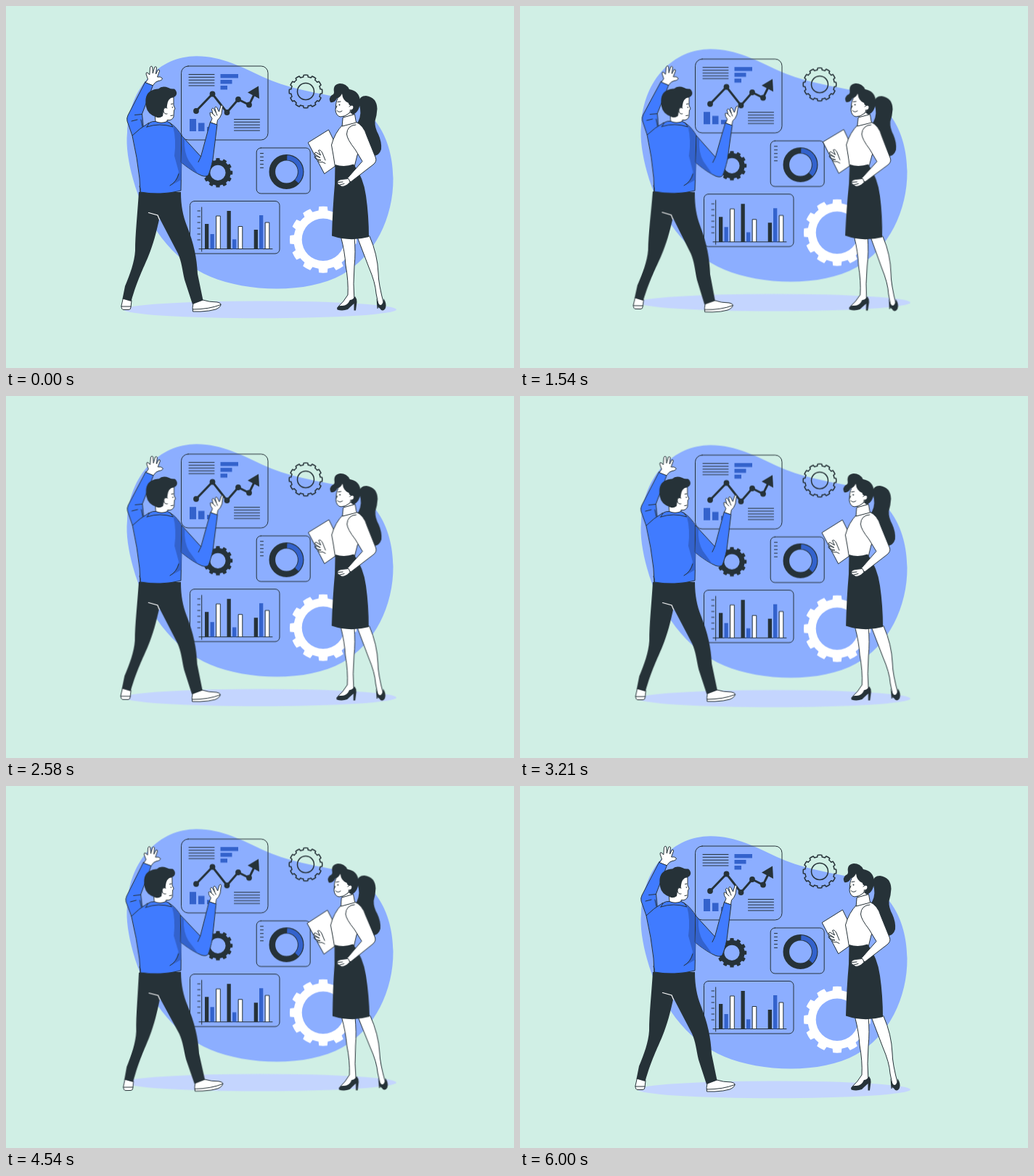
An HTML page that plays this animation: 700x500 px, repeating every 6.04 s.

```html
<!DOCTYPE html>
<html lang="en">
<head>
<meta charset="utf-8">
<title>Data presentation</title>
<style>
  html, body { margin: 0; width: 100%; height: 100%; overflow: hidden; background: #d0efe5; }
  svg { display: block; width: 100%; height: 100%; }
  .float { animation: float 6.04s linear infinite; }
  .sway { animation: sway 6.04s linear infinite; }
  #man { transform-origin: 228px 252px; }
  #woman { transform-origin: 471px 264px; }
  /* 6 s of motion, then a 40 ms rest before the loop restarts */
  @keyframes float {
    0%, 49.669%, 99.338%, 100% { transform: translateY(0); }
    24.834%, 74.503% { transform: translateY(-10px); }
  }
  @keyframes sway {
    0%, 99.338%, 100% { transform: rotate(0deg); }
    24.834% { transform: rotate(1deg); }
    74.503% { transform: rotate(-1deg); }
  }
  .dark { fill: #263238; }
  .deep { fill: #3362cc; }
  .blue { fill: #407bff; }
  .white { fill: #fff; }
  .line { fill: none; }
  .ink { stroke: #263238; stroke-width: 1; stroke-linejoin: round; stroke-linecap: round; }
</style>
</head>
<body>
<svg viewBox="0 0 700 500">
  <g class="float">
    <path fill="#8caeff" d="M262 69.3C297 69 326 85 354 98C387 113 420 118.500 452 125C507 135 533 183 533.5 238C534 292 508 346 463 371C415 398 332 395 282 374C229 352 191 298 175 239C169 217 165 194 167 175C170 111 212 69.500 262 69.3Z"/>
    <ellipse cx="350" cy="419.3" rx="188" ry="11.9" fill="#c4d5fe"/>

    <g id="trend">
      <rect class="line ink" x="241.5" y="83" width="119.5" height="102" rx="9.5"/>
      <path class="line ink" d="M252 94.5h35M252 98.4h35M252 102.3h35M252 106.2h35M252 110h35M314.500 156.500h35M314.500 160.300h35M314.500 164.200h35M314.500 168.100h35M314.500 172h35"/>
      <path class="deep" d="M295.500 94H320V99.600H295.500ZM295.500 102H311.500V107.600H295.500ZM295.500 110H305V115.600H295.500ZM253 156H262V173H253ZM265 161.500H273.500V173H265ZM277 167H285.500V173H277Z"/>
      <path class="line" stroke="#263238" stroke-width="2.9" d="M262 145L284.500 121.500L304.500 147L320 129L335 136.500L343.500 119"/>
      <path class="dark" d="M348 110.500L333 119.500L349 128Z"/>
      <g class="dark" id="dots"></g>
    </g>

    <g id="share">
      <rect class="line ink" x="345.2" y="196" width="74" height="63" rx="6"/>
      <path class="line ink" d="M350.500 203.500h4M350.500 208.500h4M350.500 213.500h4M350.500 218.500h4M350.500 223.500h4"/>
      <circle class="line" cx="386.5" cy="229" r="19.7" stroke="#263238" stroke-width="8.6"/>
      <path class="line" stroke="#3362cc" stroke-width="6.6" d="M387.300 209.500A19.500 19.500 0 0 1 400.700 242.400"/>
    </g>

    <g id="columns">
      <rect class="line ink" x="253.5" y="269.5" width="123.500" height="72.500" rx="6"/>
      <path class="line ink" d="M269.700 278V339M266 335.500H367M264 283h3.500M264 291h3.500M264 299h3.500M264 307h3.500M264 315h3.500M264 323h3.500"/>
    </g>
    <g id="gears"></g>
  </g>

  <g id="man" class="sway">
    <g class="white ink">
      <path d="M161.500 403L159 414Q159 419.500 162 419.500H169Q172 419.500 172 416L173 407Z"/>
      <path d="M258 410.500Q256.500 417 257.500 422H268Q281 421.500 289 419Q296 416 296 412Q296 410 291 409Q280 409 271 406Z"/>
      <path class="line" d="M159 415H172M257.300 419Q280 419 296 412.500"/>
    </g>
    <path class="dark" d="M183 257H241C241 276 244 290 249 303C259 328 263 348 264 370L271.500 406.500L257 412L246 378C243 365 242 353 237 342L211.500 293C207 313 203 329 196 346C189 363 181 378 172.500 408L160.500 404.500L164 387C171 370 177 354 178 338C178 315 181 290 183 257Z"/>
    <path class="line" stroke="#fff" stroke-linecap="round" stroke-width="1.2" d="M196.500 285.500L209 289L211.500 295"/>

    <path class="blue ink" d="M174 179L167 159Q166 155 168 151L192 104.500L202.500 109.500L187.500 149L190 174Z"/>
    <path class="line ink" d="M173 159L181 157M177.500 150.500L187.500 149.500M186 157L189 171"/>
    <path class="white ink" d="M192.500 105.500L195.500 101L193 94Q193 91 195 92L197.800 95L198.500 85Q200 81.500 201.700 84L202.300 93L204.700 84.500Q206.700 82.500 207.500 85L206.500 94L209.500 88Q211.500 87 211.500 90L208.500 98Q213 97 215.500 100Q215 103 210 103.500Q206 104 202.500 109.500Z"/>

    <path class="blue ink" d="M196 162Q184 169 174 179Q181 210 184 238L185 257Q213 262 241 255L242.500 180Q236 168 226 161.500Q211 157 196 162Z"/>
    <path class="deep" d="M230 166Q238 171 242.500 181L241.500 240L227 248Q235 242 238 229L232 207Q235 185 230 166Z"/>
    <path class="line ink" d="M238 232Q235 243 226 248M184 249Q186 253 185 257"/>
    <path class="blue ink" d="M242 179L268.500 208L281.500 160L291 163.500L285 212Q282 226 279 233Q277 236.500 270 234.500Q257 229 241.500 216Z"/>
    <path class="deep" d="M242.500 180L246 184Q245 202 252 214L265 232Q252 225 241.500 216Z"/>
    <path class="line ink" d="M268.500 208L265 215.500"/>
    <path class="white ink" d="M282 160.500L284 155.500Q280.500 151 281 147.500Q282.500 145.500 285 149L283.500 143Q284.500 139.500 286.500 142.500L289.500 147.500L287.700 141Q289 137.500 291 141L293.500 146L296 138Q298 135.500 298.500 138.500L297 149Q295 155 291.500 157.500L290.500 163.500Z"/>
    <path class="line ink" d="M285 149L288 152M289.500 147.500L291 151"/>

    <path class="white ink" d="M205 147L206 160Q214 164 222 160V157.500Q229 158.500 231 153L231.500 144L233 142L231 137V126H216Z"/>
    <path class="blue ink" d="M194 167L197.500 161.500Q201 159 206 159.500Q214 163 222 159.500L226 161.500L230 167Q212 161 194 167Z"/>
    <path class="dark" d="M193 139Q190 122 200 117Q205 114 210 114.500Q215 109.500 224 113Q227 115 232 114.500Q236 118 235 122Q233 126.500 229.500 126Q223 128 222 137L221.500 142Q218 141 217 145L216 152Q211 156 206 153Q195 149 193 139Z"/>
    <path class="white ink" d="M222 141Q217 139 217 145Q218 150 222 149"/>
    <path class="line ink" d="M227.500 135.500L230 135M229.300 139.500v1M227 151.500L230 151"/>
  </g>

  <g id="woman" class="sway">
    <path class="dark" d="M486 133Q487 124 496 124Q511 126 511.500 142Q511 151 508.500 159Q508 168 513 177Q518 188 517 198Q514 208 504 207L482 165Q490 154 488 142Z"/>
    <path class="white ink" d="M416.500 188.500L444.500 171L465 213L439 231.500Z"/>

    <g class="white ink">
      <path d="M461.500 319Q467 340 468 358Q472 380 471 399Q465 409 458 415L470 418L480 408Q478 384 480 359Q482 340 480 319Z"/>
      <path d="M484 319L500 361Q509 382 510 397L514 417L521 413Q513 383 513 369Q512 343 501 318Z"/>
    </g>
    <path class="dark" d="M456 417Q458 413.500 462 414Q470 415 474 406Q478 406 481 401Q484 405 483.500 409L482 420.500H479.500L479.500 411Q474 416 471 419Q464 421.500 456.500 419.500Z"/>
    <path class="dark" d="M510.500 404Q514 416 518 412Q521 408 520.500 404Q525 412 523 417Q521 421.500 517 420L513 415L512.500 418L511.500 418Z"/>

    <path class="white ink" d="M464 164Q453 175 448.500 192Q451 205 453.500 222H480L484 206L497 180Q493 166 482 160Z"/>
    <path class="dark" d="M453.500 219Q466 223 479 218.500Q493 238 496 262Q500 290 500 319Q474 326 449 317.500Q450 280 453 246Z"/>
    <path class="white ink" d="M482 160Q493 165 497 179L509.500 210Q511 215 506 219L475 243L469.500 239L491 214.500L481 198Q470 184 469.500 177Q470 165 482 164"/>
    <path class="white ink" d="M471.500 238.500L462 239.500Q456 241 457 243.500Q456 246 459 247Q462 250.500 466 249Q470 248 474 243.500Z"/>
    <path class="line ink" d="M458 243.500L464 243M460 247L466 245.500"/>

    <path class="line ink" d="M440 213L436 203Q433 197.500 430.500 199.500L433.500 206L427 202Q424 202.500 426 205L433 209.500L426.500 207Q423.500 208.500 427 211L434 213L430 213Q430 216.500 436 215.500L440 217.500"/>
    <path class="white ink" d="M465 146L465.500 155Q473 160 480 152L476 142Z"/>
    <path class="white ink" d="M464.500 154L480.500 149.500L482.500 161L463.500 166Z"/>
    <path class="white ink" d="M463 120Q455 127 454.500 137L454 144Q455 152 461 153Q467 153 473 148L477 140L471 123Z"/>
    <path class="dark" d="M447 133Q444 127 449 123Q452 122 452 119Q450 108 460 107Q469 107 473 115Q486 117 488 130Q488 146 478 150L474 147Q477 144 476 138Q472 137 472 134Q464 131 463 121Q461 126 456 127.500Q453 134 447 133Z"/>
    <path class="white ink" d="M473 139Q477 135 479 139Q479 144 474 144"/>
    <path class="line ink" d="M457 132.500L461 132M456 144.500Q459 148 463 145M456 138L454.500 141.500"/>
    <circle class="dark" cx="459.500" cy="136.500" r="1"/>
  </g>
</svg>
<script>
  const NS = "http://www.w3.org/2000/svg";

  function add(parent, tag, attrs) {
    const el = document.createElementNS(NS, tag);
    for (const key in attrs) el.setAttribute(key, attrs[key]);
    document.getElementById(parent).append(el);
  }

  // Twelve-toothed wheel outline with a round hole
  function gear(cx, cy, tip, root, hole) {
    const half = Math.PI / 12;
    const at = (r, a) => `${(cx + r * Math.sin(a)).toFixed(2)} ${(cy - r * Math.cos(a)).toFixed(2)}`;
    let d = "";
    for (let i = 0; i < 12; i++) {
      const a = i * 2 * half;
      d += `${i ? "L" : "M"}${at(root, a - half * 0.6)}L${at(tip, a - half * 0.48)}`;
      d += `A${tip} ${tip} 0 0 1 ${at(tip, a + half * 0.48)}L${at(root, a + half * 0.6)}`;
      d += `A${root} ${root} 0 0 1 ${at(root, a + half * 1.4)}`;
    }
    return `${d}ZM${cx - hole} ${cy}a${hole} ${hole} 0 1 0 ${2 * hole} 0a${hole} ${hole} 0 1 0 ${-2 * hole} 0Z`;
  }

  add("gears", "path", { d: gear(292, 230.3, 20.3, 17.6, 10.6), class: "dark", "fill-rule": "evenodd" });
  add("gears", "path", { d: gear(413, 118, 22.8, 20.3, 11.5), class: "line ink", style: "stroke-width:1.5" });
  add("gears", "path", { d: gear(437, 322.7, 46, 40.6, 29.3), class: "white", "fill-rule": "evenodd" });

  for (const [cx, cy] of [[262, 145], [284.5, 121.5], [304.5, 147], [320, 129], [335, 136.5]])
    add("dots", "circle", { cx, cy, r: 3.9 });

  // Each group: left edges and tops of the dark, blue and white columns
  const groups = [
    [[274, 301], [281.5, 315], [290, 290]],
    [[304.5, 283], [312, 322.3], [320.5, 304.5]],
    [[341.7, 309], [349, 289], [357.5, 299]]
  ];
  const tones = ["dark", "deep", "white ink"];
  for (const group of groups)
    group.forEach(([x, y], i) =>
      add("columns", "rect", { x, y, width: 5.3, height: 335.5 - y, class: tones[i] }));
</script>
</body>
</html>
```
